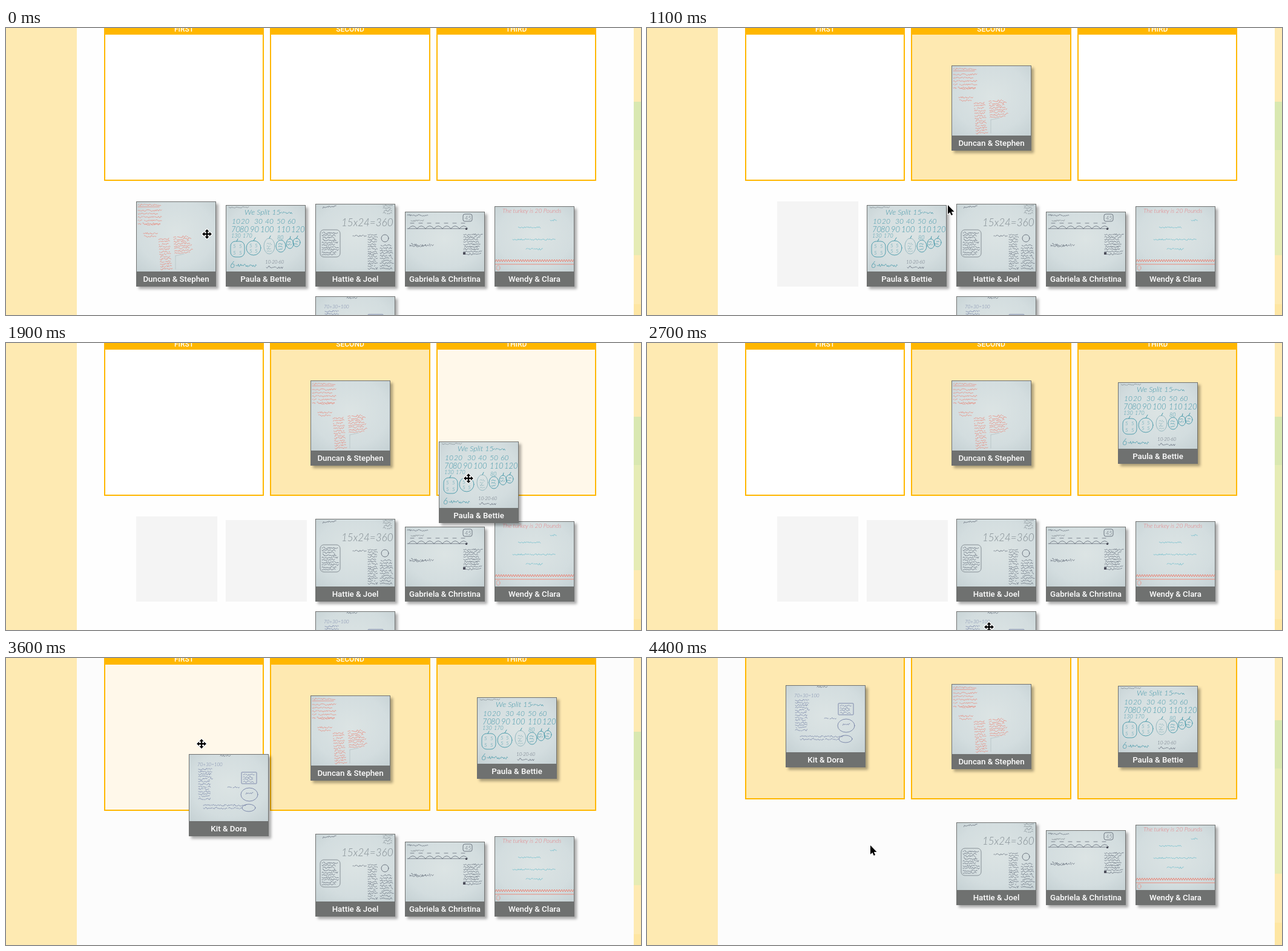
Write an HTML page that moves like this. It is 1049x475 px and loops after 4500 ms.

```html
<!DOCTYPE html>
<html lang="en">
<head>
<meta charset="utf-8">
<title>Sorting board</title>
<style>
html, body { margin: 0; width: 100%; height: 100%; overflow: hidden; background: #fefefe; }
svg { display: block; width: 100vw; height: 100vh; }
text { font-family: Roboto, sans-serif; font-weight: 500; text-anchor: middle; fill: #fff; }
.hand { font-family: Lato, sans-serif; font-weight: 300; font-style: italic; text-anchor: start; }
.card { filter: drop-shadow(4px 4px 2px rgba(0, 0, 0, .32)); }
.ink { fill: none; stroke-linejoin: round; stroke-linecap: round; }
</style>
</head>
<body>
<svg id="stage" viewBox="0 0 1049 475"></svg>
<script>
const LOOP = 4500, STEP = 100, CARD_W = 132, LABEL_H = 25;
const RED = '#e9897b', TEAL = '#4497a8', GREY = '#7d868d', DARK = '#626b78', BLUE = '#7480a5', CYAN = '#6dbdcb';

let seed = 7;
const random = () => (seed = seed * 16807 % 2147483647) / 2147483647;

const rect = (x, y, w, h, fill, extra = '') =>
  `<rect x="${x}" y="${y}" width="${w}" height="${h}" fill="${fill}" ${extra}/>`;
const ink = (d, color, width = .8) =>
  `<path class="ink" d="${d}" stroke="${color}" stroke-width="${width}"/>`;
const oval = (x, y, rx, ry, color, width = .9) =>
  `<ellipse class="ink" cx="${x}" cy="${y}" rx="${rx}" ry="${ry}" stroke="${color}" stroke-width="${width}"/>`;
const frame = (x, y, w, h, r, color) =>
  rect(x, y, w, h, 'none', `rx="${r}" stroke="${color}" stroke-width=".9"`);
const hand = (x, y, words, size, color) =>
  `<text class="hand" x="${x}" y="${y}" font-size="${size}" style="fill:${color}">${words}</text>`;
const turn = (angle, x, y, content) => `<g transform="rotate(${angle} ${x} ${y})">${content}</g>`;

// One line of illegible handwriting.
function scrawl(x, y, w, color, height = 3) {
  let d = `M${x} ${y}`;
  for (let dx = 1.3; dx < w; dx += 1.3) {
    const gap = random() < .12;
    d += `${gap ? 'M' : 'L'}${(x + dx).toFixed(1)} ${(y + (random() - .5) * height).toFixed(1)}`;
  }
  return ink(d, color, .75);
}
function block(x, y, w, rows, gap, color) {
  let out = '';
  for (let i = 0; i < rows; i++) out += scrawl(x, y + i * gap, w * (.78 + random() * .22), color);
  return out;
}

function numberRow(y, values, xs, size) {
  return values.map((v, i) => hand(xs[i], y, v, size, TEAL)).join('');
}
function hops() {
  let d = 'M4 28H102';
  for (let x = 6; x < 92; x += 14) d += `M${x} 28q7 -9 14 0M${x + 3} 19h6`;
  return ink(d, DARK, .8);
}
function zigzag() {
  let d = 'M1 92';
  for (let x = 1; x < 130; x += 4) d += 'l2 -4l2 4';
  return ink(d + 'M1 96H131', RED, 1);
}

const sheets = {
  redNotes: () => scrawl(3, 6, 38, RED) + ink('M3 9H38', RED) + block(3, 15, 42, 5, 5.5, RED) +
    scrawl(15, 38, 26, RED) + block(12, 53, 24, 2, 5, RED) +
    turn(-4, 38, 62, block(37, 63, 21, 13, 4.1, RED) + block(62, 61, 32, 8, 3.8, RED)) +
    ink('M65 90V112M65 90l14 -3', '#aeb9bd', .6),

  apples: () => scrawl(4, 4, 34, GREY, 2) + hand(31, 16, 'We Split 15', 12.5, TEAL) + scrawl(90, 13, 20, TEAL) +
    numberRow(31, [10, 20, 30, 40, 50, 60], [10, 25, 47, 65, 84, 102], 12) +
    numberRow(45, [70, 80, 90, 100, 110, 120], [9, 23, 40, 57, 84, 108], 13) +
    numberRow(54, [130, 170], [9, 28], 9) + hand(85, 57, '80', 9, TEAL) +
    frame(8, 60, 23, 26, 8, TEAL) + oval(46, 71, 12, 12, TEAL) + oval(72, 68, 9, 13, '#8eb4bb') +
    oval(91, 68, 8, 10, TEAL) + oval(106, 64, 6, 8, TEAL) + oval(117, 62, 6, 7, TEAL) +
    ink('M18 60l2 -4M46 59l3 -5M72 55l2 -4M106 56l1 -4M117 55l2 -4', TEAL, 1) +
    [[12, 71], [22, 71], [12, 82], [22, 82], [39, 70], [48, 70], [39, 79], [48, 79]]
      .map(([x, y]) => hand(x, y, 5, 8, TEAL)).join('') +
    block(68, 64, 8, 4, 4, '#8eb4bb') + block(87, 65, 8, 3, 4, TEAL) +
    block(102, 61, 8, 2, 4, TEAL) + block(113, 60, 8, 2, 4, TEAL) +
    hand(7, 104, 6, 15, TEAL) + scrawl(17, 100, 34, TEAL, 5) +
    hand(65, 97, '10·20·60', 8, DARK) + scrawl(67, 103, 28, DARK, 4),

  product: () => turn(-6, 12, 6, scrawl(11, 6, 24, DARK)) + block(112, 3, 18, 4, 4, GREY) +
    hand(43, 37, '15x24=360', 17, '#818b91') + frame(8, 43, 33, 45, 6, GREY) + block(11, 48, 28, 10, 4, DARK) +
    scrawl(62, 53, 23, DARK) + block(87, 51, 17, 15, 4, DARK) + oval(115, 57, 6, 6, DARK) +
    block(107, 69, 23, 10, 4.2, DARK),

  numberLine: () => scrawl(4, 6, 35, DARK) + scrawl(10, 15, 22, GREY) + frame(96, 4, 15, 12, 3, DARK) +
    hand(99, 14, 45, 9, DARK) + hops() + rect(100, 27, 3, 3, '#4d4f5b') +
    block(97, 38, 32, 9, 4, DARK) + rect(96, 67, 4, 4, '#4d4f5b') +
    scrawl(8, 55, 40, DARK, 5) + scrawl(8, 57, 28, DARK),

  turkey: () => hand(13, 11, 'The turkey is 20 Pounds', 10, '#e67f83') + scrawl(92, 23, 12, CYAN) +
    scrawl(38, 35, 38, CYAN, 2.5) + scrawl(30, 55, 72, CYAN, 2.5) + scrawl(52, 71, 28, CYAN) +
    zigzag() + oval(6, 102, 3, 4, RED, .6),

  sums: () => scrawl(52, 3, 17, DARK) + hand(14, 20, '70+30=100', 8, BLUE) + block(16, 25, 24, 13, 4.1, BLUE) +
    frame(87, 30, 25, 19, 1, BLUE) + block(90, 34, 19, 4, 4, BLUE) + scrawl(64, 55, 21, BLUE) +
    oval(100, 67, 14, 11, BLUE) + scrawl(93, 65, 14, BLUE) +
    block(24, 85, 74, 2, 4.5, BLUE) + oval(99, 89, 11, 6, BLUE)
};

// Keys are [time, x, y]; a drop snaps the card to the middle of its column.
const cards = [
  { name: 'Hattie & Joel', sheet: 'product', x: 511, y: 291, h: 137 },
  { name: 'Gabriela & Christina', sheet: 'numberLine', x: 659, y: 304, h: 124 },
  { name: 'Wendy & Clara', sheet: 'turkey', x: 807, y: 295, h: 133 },
  { name: 'Duncan & Stephen', sheet: 'redNotes', x: 215, y: 287, h: 141, column: 1, drop: 800,
    keys: [[200, 215, 287], [600, 595, 21], [700, 565, 38]] },
  { name: 'Paula & Bettie', sheet: 'apples', x: 363, y: 293, h: 135, column: 2, drop: 2300,
    keys: [[1400, 363, 293], [1900, 715, 163], [2200, 778, 80]] },
  { name: 'Kit & Dora', sheet: 'sums', x: 511, y: 444, h: 136, column: 0, drop: 3800,
    keys: [[3000, 511, 444], [3600, 302, 159], [3700, 262, 118]] }
];
const columns = [{ x: 162, w: 264, title: 'FIRST' }, { x: 436, w: 265, title: 'SECOND' }, { x: 711, w: 264, title: 'THIRD' }];
const pointerKeys = [
  [0, 332, 341], [200, 294, 350], [600, 674, 84], [700, 644, 101], [800, 622, 122], [1100, 497, 293],
  [1300, 412, 354], [1400, 412, 354], [1900, 764, 224], [2200, 827, 141], [2300, 820, 150],
  [2700, 565, 470], [3000, 565, 470], [3600, 323, 142], [3700, 300, 118], [3900, 304, 140], [4400, 369, 310]
];

const cardMarkup = c => `<g class="card" id="${c.sheet}">
  ${rect(0, 0, CARD_W, c.h, '#6f7170')}
  <svg x="1" y="1" width="${CARD_W - 2}" height="${c.h - LABEL_H - 1}">
    ${rect(0, 0, '100%', '100%', 'url(#paper)')}<g transform="translate(-1 -1)">${sheets[c.sheet]()}</g>
  </svg>
  <text x="${CARD_W / 2}" y="${c.h - 8}" font-size="13.3">${c.name}</text></g>`;

const columnMarkup = (c, i) =>
  rect(c.x + 1, -20, c.w - 2, 272, '#fff', `id="column${i}" stroke="#ffb700" stroke-width="2"`) +
  rect(c.x, -20, c.w, 31, '#ffb700') +
  `<text x="${c.x + c.w / 2}" y="5.5" font-size="12">${c.title}</text>`;

const moving = cards.filter(c => c.keys);
const stage = document.getElementById('stage');
stage.innerHTML = `
  <defs><radialGradient id="paper" cx=".5" cy=".45" r=".8">
    <stop offset="0" stop-color="#dce4e4"/><stop offset=".6" stop-color="#d3dddf"/><stop offset="1" stop-color="#c2ced1"/>
  </radialGradient></defs>
  ${rect(0, 0, 1049, 475, '#feeab2')}
  ${rect(117, 0, 920, 475, '#fefefe', 'id="sheet"')}
  <g id="page">
    ${rect(1037, 122, 12, 80, '#d9e8b1')}${rect(1037, 202, 12, 174, '#e6ecb5')}${rect(1037, 457, 12, 60, '#fee6a3')}
    ${columns.map(columnMarkup).join('')}
    ${moving.map(c => rect(c.x, c.y, 134, c.h, '#f4f4f4', `id="${c.sheet}Gap"`)).join('')}
    ${cards.map(cardMarkup).join('')}
  </g>
  <g id="pointer" stroke="#fff" stroke-linejoin="round" paint-order="stroke">
    <path id="cross" stroke-width="2.4" d="M0 -8l3.5 4h-2.3v2.8h2.8v-2.3l4 3.5l-4 3.5v-2.3h-2.8v2.8h2.3l-3.5 4l-3.5 -4h2.3v-2.8h-2.8v2.3l-4 -3.5l4 -3.5v2.3h2.8v-2.8h-2.3z"/>
    <path id="arrow" stroke-width="2" d="M0 0V15l3.4 -3.1l2.3 5.2l2.4 -1l-2.3 -5.1h4.7z"/>
  </g>`;

const el = id => document.getElementById(id);
const place = (node, x, y) => node.setAttribute('transform', `translate(${x.toFixed(2)} ${y.toFixed(2)})`);
const show = (node, visible) => node.setAttribute('visibility', visible ? 'visible' : 'hidden');

function along(keys, t) {
  if (t <= keys[0][0]) return keys[0].slice(1);
  for (let i = 1; i < keys.length; i++) {
    const [t0, x0, y0] = keys[i - 1], [t1, x1, y1] = keys[i];
    if (t > t1) continue;
    const p = (t - t0) / (t1 - t0), k = p * p * (3 - 2 * p);
    return [x0 + (x1 - x0) * k, y0 + (y1 - y0) * k];
  }
  return keys[keys.length - 1].slice(1);
}

function cardPosition(c, t) {
  if (!c.keys) return [c.x, c.y];
  if (t < c.drop) return along(c.keys, t);
  const { x, w } = columns[c.column];
  return [x + Math.floor(w / 2) - CARD_W / 2 + 1, Math.ceil(132 - c.h / 2) + (c.h > 140 ? 0 : 0)];
}

function draw(t) {
  const scroll = along([[4100, 0, 0], [4400, 0, 19]], t)[1];
  const [px, py] = along(pointerKeys, t);
  let overCard = false;
  const fills = columns.map(() => '#fff');

  for (const c of cards) {
    const [x, y] = cardPosition(c, t);
    place(el(c.sheet), x, y);
    overCard ||= px >= x && px <= x + CARD_W && py + scroll >= y && py + scroll <= y + c.h;
    if (!c.keys) continue;
    const held = t >= c.keys[0][0] && t < c.drop;
    overCard ||= held;
    show(el(c.sheet + 'Gap'), t > c.keys[0][0] && t < 3100);
    if (t >= c.drop) fills[c.column] = '#fee9b1';
    const target = columns[c.column];
    if (held && py < 253 && px > target.x && px < target.x + target.w) fills[c.column] = '#fff8ea';
  }

  fills.forEach((fill, i) => el('column' + i).setAttribute('fill', fill));
  el('sheet').setAttribute('fill', t < 3100 ? '#fefefe' : '#fcfcfc');
  place(el('page'), 0, -scroll);
  place(el('pointer'), px, py);
  show(el('cross'), overCard);
  show(el('arrow'), !overCard);
}

const start = performance.now();
function tick() {
  const t = (performance.now() - start) % LOOP;
  draw(Math.floor(t / STEP) * STEP);
  requestAnimationFrame(tick);
}
tick();
</script>
</body>
</html>
```
